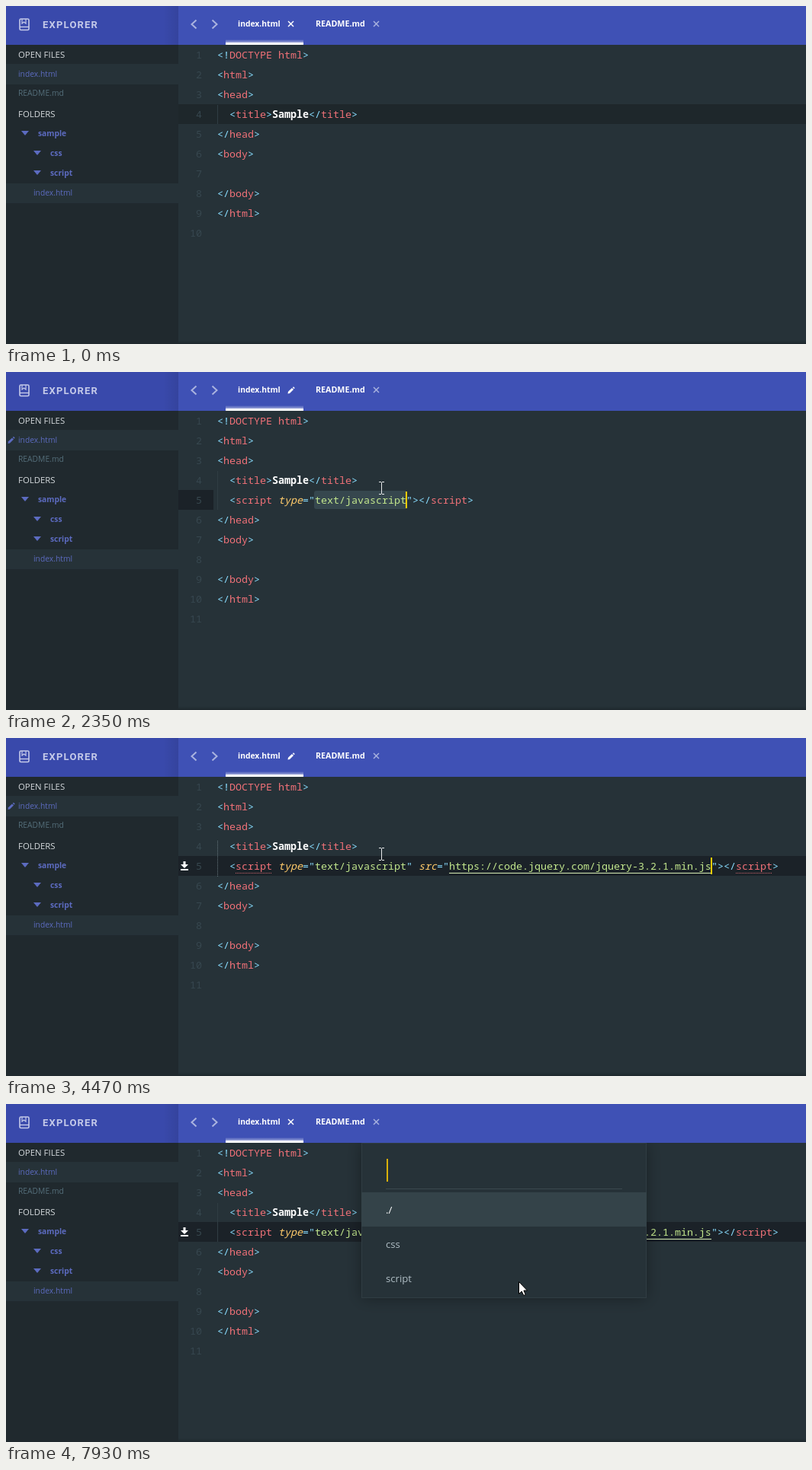
Recreate the animation shown at these times as an HTML page with a canvas. Size 1049 by 444 pixels, loop 7990 ms.

```html
<!DOCTYPE html>
<html>
<head>
<meta charset="utf-8">
<style>
html, body { margin: 0; width: 100%; height: 100%; overflow: hidden; background: #263238; }
canvas { display: block; }
</style>
</head>
<body>
<canvas id="stage" width="1049" height="444"></canvas>
<script>
const LOOP = 7990, LEFT = 277, CHAR = 8, ROW = 26;
const c = document.getElementById('stage').getContext('2d');
const UI = '"Open Sans", "Noto Sans", sans-serif';
const MONO = '"Noto Sans Mono", "DejaVu Sans Mono", monospace';
const COLORS = { punct: '#89ddff', tag: '#f07178', str: '#c3e88d', attr: '#ffcb6b', text: '#ffffff' };
const INDIGO = '#5c6bc0';

const HEAD = ['<!DOCTYPE html>', '<html>', '<head>', '  <title>Sample</title>'];
const TAIL = ['</head>', '<body>', '', '</body>', '</html>', ''];

// Each edit: time, text before the caret, text after it, completions, their column
const OPEN = '  <script type="text/javascript', END = '><\/script>';
const URL_TEXT = 'https://code.jquery.com/jquery-3.2.1.min.js';
const edits = [
  [920, '  ', ''],
  [1520, '  <', ''],
  [1830, '  <s', '', ['s', 'script', 'section', 'select', 'small', 'span', 'style'], 3],
  [1970, '  <sc', '', ['script', 'section', 'select'], 3],
  [2190, '  <scr', '', ['script'], 3],
  [2350, OPEN, '"' + END],
  [3120, OPEN + '"', END],
  [3350, OPEN + '" ', END],
  [3410, OPEN + '" s', END],
  [3490, OPEN + '" s', END, ['src', 'style', 'spellcheck', 'async', 'class', 'charset', 'accesskey'], 33],
  [3720, OPEN + '" sr', END, ['src', 'charset', 'onerror', 'onscroll', 'onsearch'], 33],
  [3880, OPEN + '" src', END, ['src'], 33],
  [3950, OPEN + '" src="', '"' + END],
  [4020, OPEN + '" src="', '"' + END, ['css/', 'script/'], 38],
  [4390, OPEN + '" src="' + URL_TEXT, '"' + END]
];

// Pointer moves: start, end, steps, then start, control and end points
const moves = [
  [60, 100, 2, 589, 294, 573, 240, 557, 187],
  [260, 460, 4, 544, 180, 515, 164, 492, 152],
  [4840, 5580, 11, 496, 150, 590, 136, 641, 163],
  [5660, 5740, 2, 641, 167, 641, 169, 641, 171],
  [6480, 7000, 8, 643, 182, 658, 248, 672, 233]
];

function rect(x, y, w, h, color) {
  c.fillStyle = color;
  c.fillRect(x, y, w, h);
}

function text(s, x, y, color, font, align = 'left') {
  c.font = font;
  c.textAlign = align;
  c.fillStyle = color;
  c.fillText(s, x, y);
}

function path(points, color, width, close) {
  c.beginPath();
  for (let i = 0; i < points.length; i += 2) c.lineTo(points[i], points[i + 1]);
  if (close) c.closePath();
  if (width) {
    c.strokeStyle = color;
    c.lineWidth = width;
    c.stroke();
  } else {
    c.fillStyle = color;
    c.fill();
  }
}

function fade(x, y, w, h, from, to, across) {
  const g = across ? c.createLinearGradient(x, 0, x + w, 0) : c.createLinearGradient(0, y, 0, y + h);
  g.addColorStop(0, from);
  g.addColorStop(1, to);
  rect(x, y, w, h, g);
}

function dots(x, y, length, color, down) {
  for (let i = 0; i < length; i += 2) rect(x + (down ? 0 : i), y + (down ? i : 0), 1, 1, color);
}

function cross(x, y, color) {
  path([x - 3.5, y - 3.5, x + 3.5, y + 3.5], color, 1.4);
  path([x + 3.5, y - 3.5, x - 3.5, y + 3.5], color, 1.4);
}

function pencil(x, y, color) {
  path([x - 4.5, y + 4.5, x - 4, y + 1.8, x + 1, y - 3, x + 3, y - 1, x - 2, y + 4], color, 0, true);
  path([x + 1.8, y - 3.7, x + 3, y - 4.7, x + 4.7, y - 3, x + 3.6, y - 1.8], color, 0, true);
}

function panel(x, y, w, h, color, blur) {
  c.save();
  c.beginPath();
  c.rect(0, 51, 1049, 393);
  c.clip();
  c.shadowColor = 'rgba(0,0,0,.35)';
  c.shadowBlur = blur;
  c.fillStyle = color;
  c.beginPath();
  c.roundRect(x, y, w, h, 4);
  c.fill();
  c.restore();
}

function drawSidebar(dirty) {
  rect(0, 51, 226, 393, '#20292e');
  rect(0, 0, 226, 51, '#3949ab');
  fade(206, 0, 20, 51, 'rgba(0,0,0,0)', 'rgba(0,0,0,.08)', true);

  c.strokeStyle = '#c5cae9';
  c.lineWidth = 1.6;
  c.beginPath();
  c.roundRect(18, 17, 12, 14.5, 1.5);
  c.stroke();
  path([18, 27.5, 30, 27.5], '#c5cae9', 1.4);
  path([21, 17, 21, 23, 23.5, 21, 26, 23, 26, 17], '#c5cae9', 1.2);
  c.letterSpacing = '1.2px';
  text('EXPLORER', 48, 28.5, '#c5cae9', 'bold 13px Roboto, sans-serif');
  c.letterSpacing = '0px';

  rect(0, 76, 226, 27, '#263238');
  rect(0, 233, 226, 26, '#263238');
  const label = '11.4px ' + UI, item = '10.3px ' + UI, folder = 'bold 10.3px ' + UI;
  text('OPEN FILES', 16, 68, '#d5dadd', label);
  text('index.html', 16, 93, INDIGO, item);
  text('README.md', 16, 118, '#546e7a', item);
  text('FOLDERS', 16, 146, '#d5dadd', label);
  [['sample', 20, 171], ['css', 36, 197], ['script', 36, 223]].forEach(([name, x, y]) => {
    path([x, y - 7, x + 10, y - 7, x + 5, y - 1], INDIGO, 0, true);
    text(name, x + 22, y, INDIGO, folder);
  });
  text('index.html', 36, 249, INDIGO, item);
  if (dirty) pencil(7, 89.5, INDIGO);
}

function drawTabs(dirty) {
  rect(226, 0, 823, 51, '#3f51b5');
  path([249.5, 18.5, 243.5, 24, 249.5, 29.5], '#aab3df', 2);
  path([270.5, 18.5, 276.5, 24, 270.5, 29.5], '#aab3df', 2);
  text('index.html', 304, 27, '#fff', 'bold 10.3px ' + UI);
  text('README.md', 406, 27, '#fff', 'bold 10.7px ' + UI);
  if (dirty) pencil(374, 24, '#fff');
  else cross(373.5, 23.5, '#fff');
  cross(485.5, 23.5, '#aab3df');
  fade(288, 44, 102, 4, 'rgba(255,255,255,0)', 'rgba(255,255,255,.5)');
  rect(288, 48, 102, 3, '#fff');
}

const TOKENS = /(?<punct><[!\/]?(?=\w)|>|=|")|(?<str>(?<==")[^"]+)|(?<tag>(?<=<[!\/]?)\w+(?: html)?)|(?<attr>(?<= )\w+(?=[=>]))|(?<text>\w+|.)/g;

function drawLine(s, n) {
  for (const m of s.matchAll(TOKENS)) {
    const kind = Object.keys(m.groups).find(k => m.groups[k]);
    const style = kind === 'attr' ? 'italic 500' : kind === 'text' ? 'bold' : '500';
    text(m[0], LEFT + CHAR * m.index, 43 + ROW * n, COLORS[kind], `${style} 13.333px ${MONO}`);
  }
}

function drawCompletions(items, col) {
  const x = LEFT + CHAR * col - 14;
  panel(x, 182, 299, items.length * 32 + 22, '#2c3a41', 6);
  rect(x, 193, 299, 32, '#37474f');
  items.forEach((s, i) => text(s, x + 14, 214 + 32 * i, i ? '#a9b6bc' : '#fff', `13.333px ${MONO}`));
}

function drawEditor(t) {
  rect(226, 51, 823, 393, '#263238');
  const edit = edits.filter(e => e[0] <= t).pop();
  const dialog = t >= 7540, selecting = t >= 2350 && t < 2730;
  const lines = edit ? [...HEAD, edit[1] + edit[2], ...TAIL] : [...HEAD, ...TAIL];
  const current = edit ? 5 : 4, top = 25 + ROW * current;

  rect(226, top, selecting ? 46 : 823, ROW, edit ? '#1b2228' : '#1e272b');
  if (selecting) {
    c.fillStyle = '#36474e';
    c.beginPath();
    c.roundRect(404, 156, 122, 24, 3);
    c.fill();
  }
  const active = t >= 620 && !selecting && !dialog;
  if (active) dots(LEFT, 135, edit ? 47 : 20, '#66757c', true);
  else rect(LEFT, 130, 1, edit ? 51 : 25, '#303d43');

  lines.forEach((s, i) => {
    const n = i + 1;
    text(n, 257, 43 + ROW * n, '#37474f', `13.333px ${MONO}`, 'right');
    drawLine(s, n);
  });

  if (active && !edit) {
    dots(301, 151, 40, '#c9646c');
    dots(413, 151, 40, '#c9646c');
  }
  if (t >= 2810 && !dialog) {
    dots(301, 177, 48, '#c9646c');
    dots(LEFT + CHAR * (lines[4].length - 7), 177, 48, '#c9646c');
  }
  if (t >= 4470) {
    rect(581, 177, 344, 1, '#d6ecb4');
    path([232.5, 162, 235.5, 162, 235.5, 166, 239, 166, 234, 171, 229, 166, 232.5, 166], '#fff', 0, true);
    rect(229, 172, 10, 2, '#fff');
  }
  if (edit && edit[3]) drawCompletions(edit[3], edit[4]);

  const since = t - (edit ? edit[0] : 620);
  const resting = t >= 1300 && t < 1520;
  if (t >= 620 && !dialog && !resting && since % 1020 < 510) {
    const col = edit ? edit[1].length : HEAD[3].length;
    rect(LEFT + CHAR * col - 1, top + 2, 2, 22, '#ffcc00');
  }
  fade(226, 439, 823, 5, 'rgba(0,0,0,0)', 'rgba(0,0,0,.2)');
}

function drawHover() {
  panel(629, 185, 317, 71, '#2c3a41', 4);
  text(URL_TEXT, 642, 212, '#c3ced3', '13px ' + UI);
  text('Download', 642, 238, '#89ddff', '13px ' + UI);
}

function drawDialog(t) {
  panel(466, 52, 374, 203, '#263238', 20);
  c.strokeStyle = '#303d43';
  c.lineWidth = 1;
  c.strokeRect(466.5, 51.5, 373, 203);
  rect(498, 111, 310, 1, '#3b494f');
  rect(466, 116, 374, 45, '#344349');
  ['./', 'css', 'script'].forEach((s, i) =>
    text(s, 498, 143.5 + 45 * i, i ? '#b0bec5' : '#fff', '13.2px ' + UI));
  rect(499, 72, 2, 30, t < 7930 ? '#ffcc00' : '#d9b10a');
}

function drawPointer(t) {
  const move = moves.filter(m => m[0] <= t).pop();
  if (!move) return;
  const [start, end, steps, x0, y0, x1, y1, x2, y2] = move;
  const u = Math.min(1, Math.floor((t - start) / (end - start) * (steps - 1) + 1e-6) / (steps - 1));
  const bend = (a, b, d) => Math.round((1 - u) ** 2 * a + 2 * u * (1 - u) * b + u * u * d);
  const x = bend(x0, x1, x2), y = bend(y0, y1, y2);
  if (t > 6480 && y > 186) {
    const arrow = [0, 0, 0, 16, 3.7, 12.6, 6.3, 18, 8.8, 17, 6.4, 11.5, 11, 11.5]
      .map((v, i) => v + (i % 2 ? y : x) + .5);
    path(arrow, '#fff', 0, true);
    path(arrow, '#000', 1, true);
  } else {
    rect(x, y - 7, 1, 15, '#e8eaeb');
    for (const edge of [y - 8, y + 8]) {
      rect(x - 3, edge, 3, 1, '#e8eaeb');
      rect(x + 1, edge, 3, 1, '#e8eaeb');
    }
  }
}

function frame(now) {
  const t = now % LOOP, dirty = t >= 920 && t < 7540;
  drawEditor(t);
  drawSidebar(dirty);
  drawTabs(dirty);
  if (t >= 6100 && t < 7540) drawHover();
  if (t >= 7540) drawDialog(t);
  drawPointer(t);
  requestAnimationFrame(frame);
}
requestAnimationFrame(frame);
</script>
</body>
</html>
```
